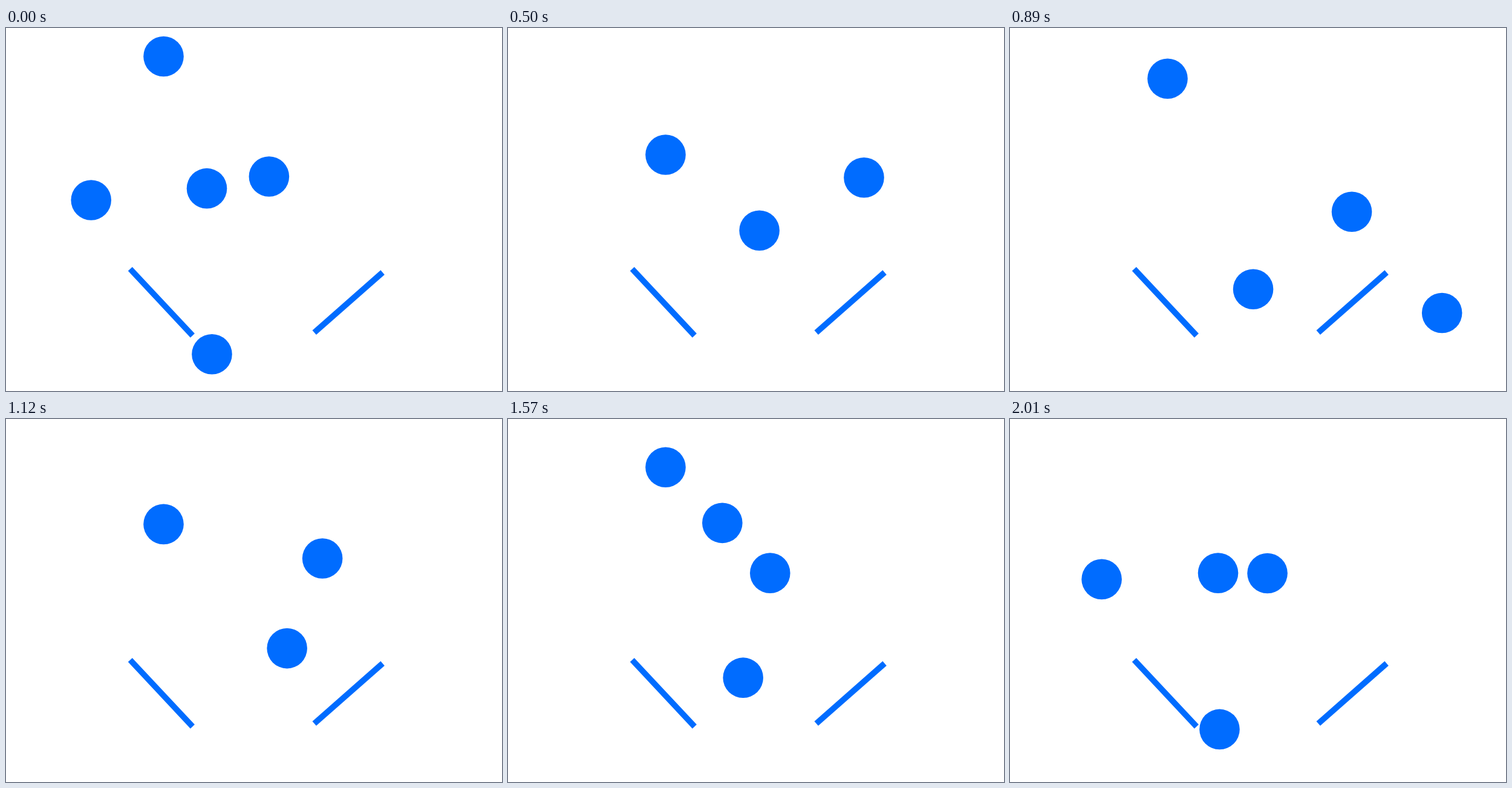
Animation of 820x600 px, one loop 2.04 s. Source, as an HTML page with a canvas:

```html
<!DOCTYPE html>
<html lang="en">
<head>
<meta charset="utf-8">
<title>Bouncing balls</title>
<style>
  html, body { margin: 0; width: 100%; height: 100%; overflow: hidden; background: #fff; }
  canvas { display: block; }
</style>
</head>
<body>
<canvas id="stage" width="820" height="600"></canvas>
<script>
const ctx = document.getElementById('stage').getContext('2d');
const BLUE = '#006cff';
const RADIUS = 33.3;
const FALL = 0.1373;      // half of gravity, px per step squared
const LOOP_MS = 2040;
const LOOP_STEPS = 135;   // physics steps in one loop
const LONG = [8, 29, 53]; // frames that last 50 ms and skip an extra step

const bars = [
  [205.3, 398.3, 308.4, 508.4],
  [509.7, 503.4, 622.6, 404]
];

// Contacts [step, x, y]; the ball flies freely from one to the next.
const drop = [0, 260.5, 47];
const leftHit = [49.4, 260.5, 401.5];
const rightHit = [66.7, 491.5, 466.9];
const balls = [
  { born: 0, path: [drop, leftHit, rightHit, [112.9, 321.6, 157.9], [131.4, 353.6, 247],
    [150.1, 241.5, 380], [186.1, 591.7, 378.4], [277, 319.5, 640]] },
  { born: 45, path: [drop, leftHit, rightHit, [86.4, 418.1, 263.4], [163, 774.7, 650.2]] },
  { born: 90, path: [drop, [22.9, 260.5, 128.6], [72, -5.6, 657]] }
];

function stepAt(ms) {
  let frame = 0, end = 0;
  for (;; frame++) {
    end += LONG.includes(frame) ? 50 : 30;
    if (ms < end || end >= LOOP_MS) break;
  }
  return 2 * frame + LONG.filter(n => n <= frame).length;
}

function place(path, s) {
  const i = path.findIndex(p => p[0] > s);
  if (i < 1) return null;
  const [s0, x0, y0] = path[i - 1];
  const [s1, x1, y1] = path[i];
  const span = s1 - s0, t = s - s0;
  const vx = (x1 - x0) / span;
  const vy = (y1 - y0) / span - FALL * span;
  return [x0 + vx * t, y0 + vy * t + FALL * t * t];
}

function draw(ms) {
  const step = stepAt(ms);
  ctx.fillStyle = '#fff';
  ctx.fillRect(0, 0, 820, 600);

  ctx.strokeStyle = ctx.fillStyle = BLUE;
  ctx.lineWidth = 9.7;
  for (const [x0, y0, x1, y1] of bars) {
    ctx.beginPath();
    ctx.moveTo(x0, y0);
    ctx.lineTo(x1, y1);
    ctx.stroke();
  }

  for (const { born, path } of balls) {
    const life = path[path.length - 1][0];
    for (let age = step - born; age < life; age += LOOP_STEPS) {
      const pos = place(path, age);
      if (!pos) continue;
      ctx.beginPath();
      ctx.arc(pos[0], pos[1], RADIUS, 0, Math.PI * 2);
      ctx.fill();
    }
  }
}

const start = performance.now();
function tick() {
  draw((performance.now() - start) % LOOP_MS);
  requestAnimationFrame(tick);
}
tick();
</script>
</body>
</html>
```
